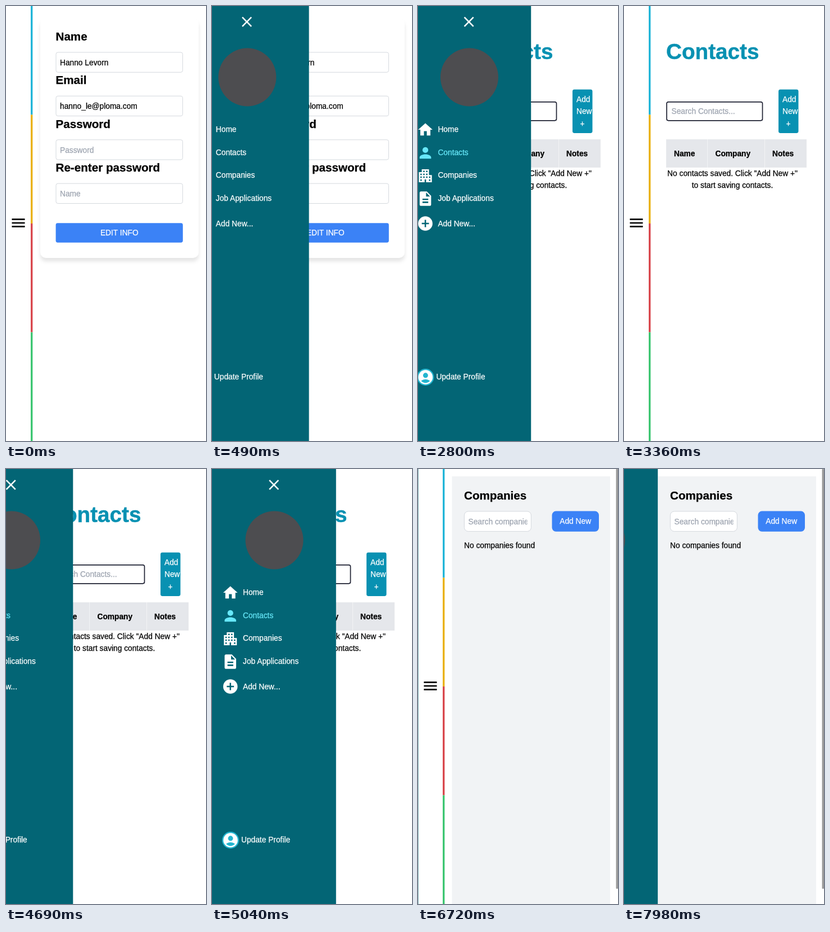
An HTML page for the animation above (8 s loop, 356 px wide and 770 px high).

```html
<!DOCTYPE html>
<html lang="en">
<head>
<meta charset="utf-8">
<title>Sidebar menu</title>
<style>
  html, body { margin: 0; height: 100%; overflow: hidden; background: #fff; }
  svg { display: block; width: 100vw; height: 100vh; }
  text { font: 13.76px "Liberation Sans", Arial, sans-serif; white-space: pre; stroke-width: .25px; }
  .bold { font-weight: 700; }
  .label { font-size: 20.64px; font-weight: 700; }
  .title { font-size: 38.7px; font-weight: 700; stroke-width: .5px; }
  .mid { text-anchor: middle; }
  .card { filter: drop-shadow(0 6px 3px rgb(0 0 0 / .1)); }
</style>
</head>
<body>
<svg id="stage" viewBox="0 0 356 770" preserveAspectRatio="none"></svg>
<script>
const LOOP = 8000, STEP = 70, SLIDE = 500, MENU_WIDTH = 220.8;
const TOGGLES = [250, 2752, 4533, 6252, 7885]; // open, close, open, ...
const TO_CONTACTS = 2800, TO_COMPANIES = 6300;
const BLUE = '#3b82f6', TEAL = '#0891b2', CYAN = '#67e8f9', HINT = '#9ca3af', LINE = '#d1d5db';

const rect = (x, y, w, h, fill, extra = '') =>
  `<rect x="${x}" y="${y}" width="${w}" height="${h}" fill="${fill}" ${extra}/>`;
// a hairline stroke gives the slightly heavier screen rendering
const text = (x, y, str, fill = '#000', cls = '') =>
  `<text x="${x}" y="${y}" fill="${fill}" stroke="${fill}" class="${cls}">${str}</text>`;
const field = (x, y, w, h, radius, stroke = LINE, width = 0.9) =>
  rect(x, y, w, h, '#fff', `rx="${radius}" stroke="${stroke}" stroke-width="${width}"`);
// 24-unit icons centred on (x, y)
const icon = (x, y, d, fill = 'currentColor') =>
  `<path transform="translate(${x} ${y}) scale(1.28) translate(-12 -12)" fill="${fill}" fill-rule="evenodd" d="${d}"/>`;

const windows = [[5, 9, 13, 17], [9, 5, 9, 13], [13, 5, 9, 13], [17, 13, 17]]
  .map(([x, ...rows]) => rows.map(y => `M${x} ${y}h2v2h-2z`).join('')).join('');
const disc = 'M12 2a10 10 0 0 0 0 20a10 10 0 0 0 0-20z';
const ICONS = {
  burger: 'M3 18h18v-2H3zm0-5h18v-2H3zm0-7v2h18V6z',
  close: 'M19 6.41 17.59 5 12 10.59 6.41 5 5 6.41 10.59 12 5 17.59 6.41 19 12 13.41 17.59 19 19 17.59 13.41 12z',
  home: 'M10 20v-6h4v6h5v-8h3L12 3 2 12h3v8z',
  person: 'M12 12a4 4 0 0 0 0-8a4 4 0 0 0 0 8zm0 2c-2.67 0-8 1.34-8 4v2h16v-2c0-2.66-5.33-4-8-4z',
  building: 'M17 11V3H7v4H3v14h8v-4h2v4h8V11z' + windows,
  page: 'M14 2H6a2 2 0 0 0-2 2v16a2 2 0 0 0 2 2h12a2 2 0 0 0 2-2V8zm2 16H8v-2h8zm0-4H8v-2h8zm-3-5V3.5L18.5 9z',
  plus: disc + 'm5 11h-4v4h-2v-4H7v-2h4V7h2v4h4z',
  account: disc + 'm0 4a3.5 3.5 0 0 1 0 7a3.5 3.5 0 0 1 0-7zm0 14c-2.03 0-4.43-.82-6.14-2.88a10 10 0 0 1 12.28 0C16.43 19.18 14.03 20 12 20z',
};

function profilePage() {
  const rows = [['Name', 'Hanno Levorn', '#000'], ['Email', 'hanno_le@ploma.com', '#000'],
    ['Password', 'Password', HINT], ['Re-enter password', 'Name', HINT]];
  return rect(61, 22, 282, 424, '#fff', 'rx="10" class="card"') +
    rows.map(([label, value, color], i) => {
      const y = i * 77.4;
      return text(88.5, 61 + y, label, '#000', 'label') +
        field(89, 82 + y, 225.5, 35.3, 3.4) + text(96, 105 + y, value, color);
    }).join('') +
    rect(88.6, 384.3, 226.2, 34.4, BLUE, 'rx="3.4"') +
    text(201.8, 406, 'EDIT INFO', '#fff', 'mid');
}

function contactsPage() {
  const columns = [[89, 'Name'], [162.5, 'Company'], [264, 'Notes']];
  return text(75, 94, 'Contacts', TEAL, 'title') +
    field(76, 169.8, 170.5, 33, 3, '#1f2233', 1.7) + text(84.5, 191, 'Search Contacts...', HINT) +
    rect(275, 147.7, 35.5, 77.3, TEAL, 'rx="3.4"') +
    text(282, 170, 'Add', '#fff') + text(282, 191, 'New', '#fff') + text(288.5, 212.5, '+', '#fff') +
    rect(75, 236, 250, 50, '#e5e7eb') +
    [148, 250].map(x => rect(x, 236, 0.9, 50, '#f3f4f6')).join('') +
    columns.map(([x, name]) => text(x, 266, name, '#000', 'bold')).join('') +
    text(193, 301, 'No contacts saved. Click "Add New +"', '#000', 'mid') +
    text(193, 322, 'to start saving contacts.', '#000', 'mid');
}

function companiesPage() {
  return rect(60.5, 13, 281.5, 757, '#f1f3f5') +
    text(82, 54, 'Companies', '#000', 'label') +
    field(82.4, 75, 119, 35.4, 7) +
    `<clipPath id="hint">${rect(83, 76, 111.5, 34, '#000')}</clipPath>` +
    `<g clip-path="url(#hint)">${text(89.5, 98, 'Search companies...', HINT)}</g>` +
    rect(238.5, 74.6, 83.5, 36.2, BLUE, 'rx="7"') + text(280.2, 97, 'Add New', '#fff', 'mid') +
    `<g id="result">${text(82, 139.5, 'No companies found')}</g>` +
    rect(352.5, 0, 3.5, 743, '#9b9b9b', 'rx="1"');
}

function rail() {
  return ['#22b5d8', '#eab211', '#d9484e', '#3dc672']
    .map((color, i) => rect(44, i * 192.5, 3.4, 192.5, color)).join('') +
    icon(22, 384, ICONS.burger, '#000');
}

function menu() {
  const items = [['home', 'Home', 219, 223], ['person', 'Contacts', 260, 263.5],
    ['building', 'Companies', 300.5, 304], ['page', 'Job Applications', 341, 344.5],
    ['plus', 'Add New...', 385, 389.5]];
  return rect(-20, 0, MENU_WIDTH + 20, 770, '#036575') +
    icon(110.2, 28, ICONS.close, '#fff') +
    '<circle cx="111" cy="126" r="51.5" fill="#4d4d50"/>' +
    items.map(([name, label, iconY, textY]) =>
      `<g id="${name}" color="#fff">${icon(32.7, iconY, ICONS[name])}${text(55, textY, label, 'currentColor')}</g>`).join('') +
    '<circle cx="33" cy="657" r="15" fill="#22b5cf"/>' +
    icon(33, 657, ICONS.account, '#fff') + text(52, 661, 'Update Profile', '#fff');
}

const stage = document.getElementById('stage');
const group = (id, body) => `<g id="${id}">${body}</g>`;
stage.innerHTML = group('profile', profilePage()) + group('contacts', contactsPage()) +
  group('companies', companiesPage()) + rail() + group('menu', menu());
const byId = id => document.getElementById(id);
const show = (id, visible) => byId(id).setAttribute('display', visible ? 'inline' : 'none');

// CSS "ease": cubic-bezier(.25, .1, .25, 1)
function ease(x) {
  if (x <= 0 || x >= 1) return x <= 0 ? 0 : 1;
  const curve = (s, a, b) => 3 * (1 - s) * s * ((1 - s) * a + s * b) + s ** 3;
  let low = 0, high = 1;
  for (let i = 0; i < 24; i++) {
    const s = (low + high) / 2;
    if (curve(s, 0.25, 0.25) < x) low = s; else high = s;
  }
  return curve(low, 0.1, 1);
}

function draw(now) {
  const t = Math.floor((now % LOOP) / STEP) * STEP;
  const open = TOGGLES.reduce((sum, start, i) => sum + (i % 2 ? -1 : 1) * ease((t - start) / SLIDE), 0);
  const page = t < TO_CONTACTS ? 'profile' : t < TO_COMPANIES ? 'contacts' : 'companies';
  for (const id of ['profile', 'contacts', 'companies']) show(id, id === page);
  show('result', t > TO_COMPANIES); // the empty result arrives one step after the page
  byId('person').setAttribute('color', page === 'contacts' ? CYAN : '#fff');
  byId('building').setAttribute('color', page === 'companies' ? CYAN : '#fff');
  byId('menu').setAttribute('transform', `translate(${(open - 1) * MENU_WIDTH} 0)`);
}

const begin = performance.now();
function tick() {
  draw(performance.now() - begin);
  requestAnimationFrame(tick);
}
tick();
</script>
</body>
</html>
```
